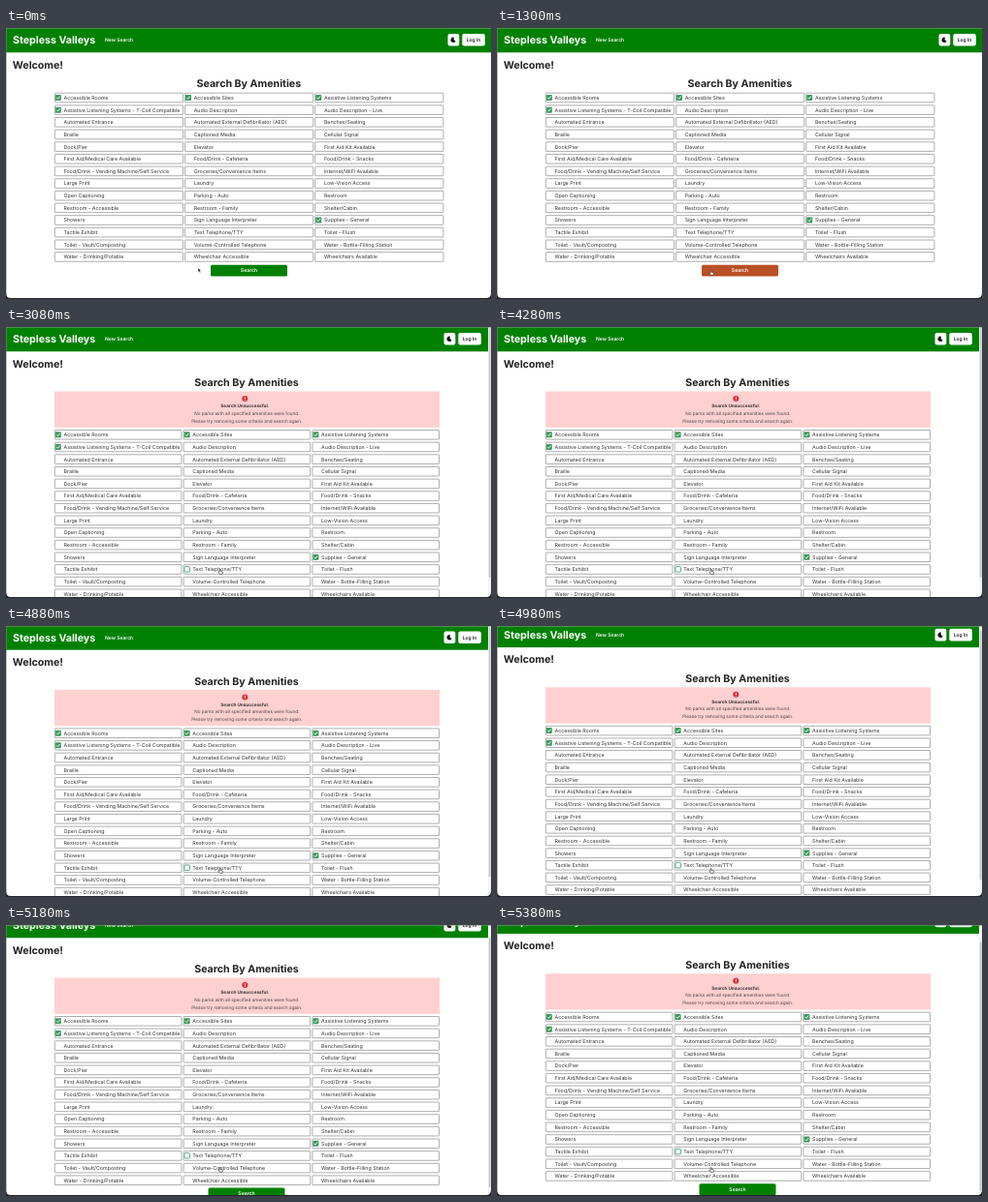
Write an HTML page that moves like this. It is 500 by 280 pixels and loops after 5980 ms.

```html
<!DOCTYPE html>
<html lang="en">
<head>
<meta charset="utf-8">
<title>Search By Amenities</title>
<style>
  html, body { margin: 0; width: 100%; height: 100%; overflow: hidden; background: #fff; }
  svg { display: block; width: 500px; height: 280px; font-family: Inter, "Open Sans", sans-serif; text-rendering: geometricPrecision; }
</style>
</head>
<body>
<svg id="stage" viewBox="0 0 500 280"></svg>
<script>
const LOOP = 5980, HOVER = 800, LOADING = 1400, FAILED = 3080;
const ROW = 12.65, BOX_H = 9.6, HEADING = 10.65, BODY = 5.3, SMALL = 4.66;
const AMENITIES = `Accessible Rooms|Accessible Sites|Assistive Listening Systems
Assistive Listening Systems - T-Coil Compatible|Audio Description|Audio Description - Live
Automated Entrance|Automated External Defibrillator (AED)|Benches/Seating
Braille|Captioned Media|Cellular Signal
Dock/Pier|Elevator|First Aid Kit Available
First Aid/Medical Care Available|Food/Drink - Cafeteria|Food/Drink - Snacks
Food/Drink - Vending Machine/Self Service|Groceries/Convenience Items|Internet/WiFi Available
Large Print|Laundry|Low-Vision Access
Open Captioning|Parking - Auto|Restroom
Restroom - Accessible|Restroom - Family|Shelter/Cabin
Showers|Sign Language Interpreter|Supplies - General
Tactile Exhibit|Text Telephone/TTY|Toilet - Flush
Toilet - Vault/Composting|Volume-Controlled Telephone|Water - Bottle-Filling Station
Water - Drinking/Potable|Wheelchair Accessible|Wheelchairs Available`
  .split("\n").map(line => line.split("|"));
const CHECKED = new Set(["0,0", "0,1", "0,2", "1,0", "10,2"]);

// [start ms, value]; each value holds until the next start
const SCROLL = [[0, 0], [4780, 0.3], [4880, 0.6], [4980, 3.2], [5080, 7.6], [5180, 12], [5280, 15], [5380, 16.3]];
const POINTER = [[0, 198], [600, 200], [700, 206], [800, 213], [900, 218], [1000, 221]];

const stage = document.getElementById("stage");

function add(parent, tag, attrs, text) {
  const el = document.createElementNS("http://www.w3.org/2000/svg", tag);
  for (const key in attrs) el.setAttribute(key, attrs[key]);
  if (text) el.textContent = text;
  parent.append(el);
  return el;
}
const rect = (g, x, y, width, height, fill, rx = 0, more = {}) =>
  add(g, "rect", { x, y, width, height, fill, rx, ...more });
const path = (g, d, more) => add(g, "path", { d, ...more });
// y is the middle of the line
const label = (g, x, y, size, text, weight = 400, fill = "#222", anchor = "start") =>
  add(g, "text", { x, y: y + size * 0.36, "font-size": size, "font-weight": weight, fill, "text-anchor": anchor }, text);

function drawHeader(g, right, shift) {
  rect(g, 0, 0, right, 25.3, "#008000");
  label(g, 7, 12.5, HEADING, "Stepless Valleys", 700, "#fff");
  label(g, 102, 12.5, 5, "New Search", 600, "#fff");
  rect(g, 455.5 - shift, 6, 11.8, 12.6, "#fff", 2);
  path(g, "M1 -2.6A2.7 2.7 0 1 0 2.6 1.2A2.5 2.5 0 0 1 1 -2.6Z",
    { transform: `translate(${461 - shift} 12.4)`, fill: "#111" });
  rect(g, 470.3 - shift, 6, 23.5, 12.6, "#fff", 2);
  label(g, 482 - shift, 12.4, 5, "Log In", 600, "#222", "middle");
  label(g, 6.8, 37.8, HEADING, "Welcome!", 700);
}

function drawCheckbox(g, x, y, key, disabled) {
  if (CHECKED.has(key)) {
    rect(g, x - 3, y - 3, 6, 6, disabled ? "#d0d0d0" : "#3c9a60", 0.8);
    path(g, `M${x - 1.6} ${y}l1.2 1.3l2.1 -2.7`,
      { fill: "none", stroke: disabled ? "#888" : "#fff", "stroke-width": 0.9 });
  } else if (disabled) {
    rect(g, x - 2.5, y - 2.5, 5, 5, "#fafafa", 0.8, { stroke: "#ddd", "stroke-width": 0.5 });
  }
}

function drawGrid(g, top, colWidth, step, disabled) {
  AMENITIES.forEach((row, r) => row.forEach((name, c) => {
    const x = 50.3 + c * step, y = top + r * ROW;
    rect(g, x, y - BOX_H / 2, colWidth, BOX_H, "#fff", 0.5, { stroke: "#8c8c8c", "stroke-width": 0.7 });
    drawCheckbox(g, x + 3.5, y, r + "," + c, disabled);
    label(g, x + 9.2, y, BODY, name, 400, disabled ? "#a8a8a8" : "#333");
  }));
}

function drawButton(g, cx, cy, text, fill) {
  const box = rect(g, cx - 39.5, cy - 5.8, 79, 11.6, fill, 1.5);
  label(g, cx, cy, 5.1, text, 600, "#fff", "middle");
  return box;
}

function drawAlert(g, cx) {
  rect(g, 50, 66.5, 397, 37.3, "#ffd0d0");
  add(g, "circle", { cx: cx - 2, cy: 74, r: 3, fill: "#dc3039" });
  rect(g, cx - 2.4, 72.3, 0.8, 2.1, "#fff");
  rect(g, cx - 2.4, 75, 0.8, 0.8, "#fff");
  label(g, cx - 2, 81.6, SMALL, "Search Unsuccessful.", 700, "#333", "middle");
  label(g, cx, 89, SMALL, "No parks with all specified amenities were found.", 400, "#444", "middle");
  label(g, cx, 96.9, SMALL, "Please try removing some criteria and search again.", 400, "#444", "middle");
}

function drawSearch(disabled) {
  const g = add(stage, "g");
  drawHeader(g, 500, 0);
  label(g, 250.3, 57.5, HEADING, "Search By Amenities", 700, "#222", "middle");
  drawGrid(g, 72, 132.2, 134.2, disabled);
  const button = drawButton(g, 250.5, 250.6, disabled ? "Loading Results..." : "Search", disabled ? "#f2c4ac" : "#008000");
  return { g, button };
}

function drawFailed() {
  const g = add(stage, "g"), page = add(g, "g");
  drawHeader(page, 497, 4);
  label(page, 248, 57.4, HEADING, "Search By Amenities", 700, "#222", "middle");
  drawAlert(page, 248.3);
  drawGrid(page, 111.3, 130.6, 132.8, false);
  rect(page, 184, 247.6, 5.5, 5.5, "#fff", 0.8, { stroke: "#2f9d6a", "stroke-width": 0.8 });
  drawButton(page, 248, 289.4, "Search", "#008000");
  rect(g, 497, 0, 3, 280, "#f4f4f4");
  const thumb = rect(g, 497.8, 1, 1.6, 258, "#c2c2c2", 0.8);
  return { g, page, thumb };
}

const idle = drawSearch(false), loading = drawSearch(true), failed = drawFailed();

// window edges
rect(stage, 0, 0, 500, 0.6, "#7f9a80");
rect(stage, 0, 0, 0.5, 280, "#8a8f8a");
path(stage, "M0 274Q0 279 5 279H495Q500 279 500 274V280H0Z", { fill: "#23252b" });

const outline = { fill: "#111", stroke: "#fff", "stroke-width": 0.5, "stroke-linejoin": "round" };
const arrow = add(stage, "g"), hand = add(stage, "g");
path(arrow, "M0 -2.3V2.3L1.1 1.3L1.9 2.9L2.7 2.5L2 1H3.2Z", outline);
path(hand, "M-0.9 -1.9Q-0.3 -2.5 0.1 -1.8V-0.3L2 0.1Q2.7 0.4 2.5 1.2L2 2.7H-0.6L-2 0.9Q-1.9 0.2 -0.9 0.7Z",
  { ...outline, fill: "#fff", stroke: "#222", "stroke-width": 0.6 });
const blocked = add(arrow, "g", { transform: "translate(2.5 4.6)", fill: "#fff", stroke: "#777", "stroke-width": 0.7 });
add(blocked, "circle", { r: 1.8 });
path(blocked, "M-1.2 -1.2L1.2 1.2");

const held = (steps, t) => steps.reduce((v, [start, value]) => t >= start ? value : v, 0);
const show = (el, on) => el.setAttribute("display", on ? "inline" : "none");

function render(t) {
  const isLoading = t >= LOADING && t < FAILED, isFailed = t >= FAILED;
  show(idle.g, t < LOADING);
  show(loading.g, isLoading);
  show(failed.g, isFailed);
  idle.button.setAttribute("fill", t < HOVER ? "#008000" : t < HOVER + 100 ? "#5e6810" : "#b95025");

  const scroll = held(SCROLL, t);
  failed.page.setAttribute("transform", `translate(0 ${-scroll})`);
  failed.thumb.setAttribute("y", 1 + scroll);

  const x = held(POINTER, t), y = 250 + (x - 198) / 23 * 2.6;
  const onButton = t >= HOVER && !isLoading;
  show(arrow, !onButton);
  show(hand, onButton);
  show(blocked, isLoading);
  for (const el of [arrow, hand]) el.setAttribute("transform", `translate(${x} ${y})`);
}

const begin = performance.now();
function tick() {
  render((performance.now() - begin) % LOOP);
  requestAnimationFrame(tick);
}
render(0);
requestAnimationFrame(tick);
</script>
</body>
</html>
```
